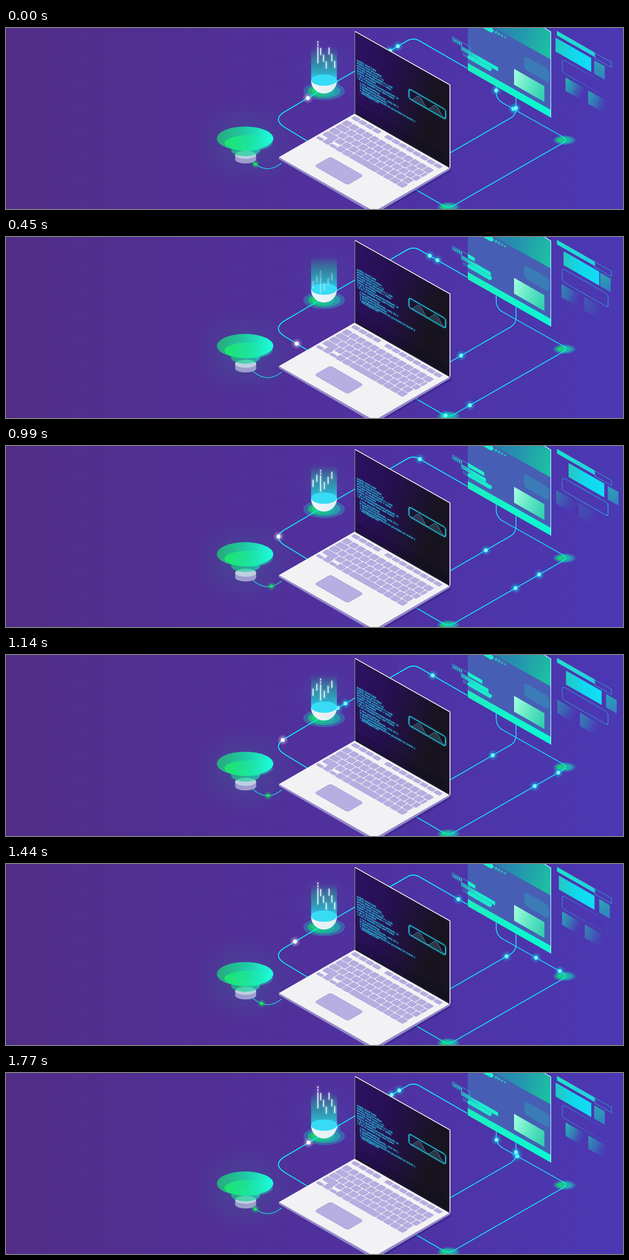
Recreate the animation shown at these times as an HTML page with a canvas. Size 1280 px wide and 377 px high, loop 1800 ms.

```html
<!DOCTYPE html>
<html lang="en">
<head>
<meta charset="utf-8">
<title>Connected laptop</title>
<style>
html, body { margin: 0; width: 100%; height: 100%; overflow: hidden; background: #502f9a; }
canvas { display: block; }
</style>
</head>
<body>
<canvas id="stage" width="1280" height="377"></canvas>
<script>
const W = 1280, H = 377, LOOP = 1800, STEP = 30, CYCLE = 1753, SLOPE = 0.575;
const TAU = Math.PI * 2, CYAN = '#10eef8';
const screen = document.getElementById('stage').getContext('2d');
let c = screen;

// ---- helpers ----
const mod = (a, n) => ((a % n) + n) % n;
const clamp = v => Math.max(0, Math.min(1, v));
const wave = (t, delay = -30, period = CYCLE) => Math.cos(TAU * (t - delay) / period);

function grad(x0, y0, x1, y1, ...stops) {
  const g = c.createLinearGradient(x0, y0, x1, y1);
  stops.forEach((color, i) => g.addColorStop(i / (stops.length - 1), color));
  return g;
}
function halo(x, y, r, rgb, alpha, squash = 1) {
  c.save();
  c.translate(x, y);
  c.scale(1, squash);
  const g = c.createRadialGradient(0, 0, 0, 0, 0, r);
  g.addColorStop(0, `rgba(${rgb},${alpha})`);
  g.addColorStop(0.5, `rgba(${rgb},${alpha * 0.4})`);
  g.addColorStop(1, `rgba(${rgb},0)`);
  c.fillStyle = g;
  c.fillRect(-r, -r, 2 * r, 2 * r);
  c.restore();
}
function oval(x, y, rx, ry, fill) {
  c.beginPath();
  c.ellipse(x, y, rx, ry, 0, 0, TAU);
  c.fillStyle = fill;
  c.fill();
}
function trace(pts) {
  c.beginPath();
  pts.forEach(([x, y], i) => i ? c.lineTo(x, y) : c.moveTo(x, y));
}
function poly(fill, ...pts) {
  trace(pts);
  c.closePath();
  c.fillStyle = fill;
  c.fill();
}
function line(color, width, ...pts) {
  trace(pts);
  c.strokeStyle = color;
  c.lineWidth = width;
  c.stroke();
}
function box(x, y, w, h, { fill, stroke, r = 0, lw = 1 }) {
  c.beginPath();
  c.roundRect(x, y, w, h, r);
  if (fill) { c.fillStyle = fill; c.fill(); }
  if (stroke) { c.strokeStyle = stroke; c.lineWidth = lw; c.stroke(); }
}
// Upright plate receding to the right
function plate(x, y, w, h, style) {
  c.save();
  c.transform(1, SLOPE, 0, 1, x, y);
  box(0, 0, w, h, style);
  c.restore();
}
function layer(draw) {
  const cv = document.createElement('canvas');
  cv.width = W;
  cv.height = H;
  c = cv.getContext('2d');
  draw();
  c = screen;
  return cv;
}

// ---- routes: polylines with rounded corners ----
function route(...pts) {
  const out = [pts[0]];
  for (let i = 1; i < pts.length - 1; i++) {
    const [x, y, r] = pts[i];
    const toward = ([px, py]) => {
      const d = Math.hypot(px - x, py - y);
      return [x + (px - x) * r / d, y + (py - y) * r / d];
    };
    const a = toward(pts[i - 1]), b = toward(pts[i + 1]);
    for (let k = 0; k <= 14; k++) {
      const u = k / 14, v = 1 - u;
      out.push([0, 1].map(n => v * v * a[n] + 2 * u * v * pts[i][n] + u * u * b[n]));
    }
  }
  out.push(pts[pts.length - 1]);
  return out;
}
function pointAt(path, d) {
  for (let i = 1; i < path.length; i++) {
    const [ax, ay] = path[i - 1], [bx, by] = path[i];
    const len = Math.hypot(bx - ax, by - ay);
    if (d <= len) return [ax + (bx - ax) * d / len, ay + (by - ay) * d / len];
    d -= len;
  }
  return null;
}
const upper = route([668, 122], [845, 19.3, 15], [957, 84]);
const left = route([625, 235.5], [551, 190.3, 33], [648, 133]);
const middle = route([918, 262], [1058, 181, 14], [1058, 145]);
const outer = route([849, 336], [918, 376, 12], [1166.5, 233, 14], [1017, 148.5, 16], [1017, 122]);
const wire = route([572, 281], [543, 302, 31], [511, 279]);

const cyan = { fill: '#7df6ff', rgb: '0,225,255', r: 4 };
const white = { fill: '#ffffff', rgb: '235,225,255', r: 4 };
const green = { fill: '#17e565', rgb: '20,230,100', r: 3.2 };

// Sends one dot along a path per period; speed in px per ms
function send(t, path, start, speed, look = cyan, period = CYCLE) {
  const p = pointAt(path, mod(t - start, period) * speed);
  if (!p) return;
  halo(...p, look.r * 2.9, look.rgb, 0.85);
  oval(...p, look.r, look.r, look.fill);
}
function drawDots(t) {
  for (const start of [-72, 936, 1026]) send(t, upper, start, 0.205);
  for (const start of [30, 214]) send(t, outer, start, 0.3067, cyan, LOOP);
  send(t, middle, 176, 0.11);
  send(t, left, 192, 0.0987, white);
  send(t, wire, 460, 0.046, green);
}

// ---- still parts behind the dots ----
function rings(x, y, s) {
  oval(x, y, 23 * s, 10 * s, 'rgba(38,165,190,.42)');
  oval(x, y, 18 * s, 7.6 * s, grad(x - 18 * s, y, x + 18 * s, y, 'rgba(20,205,110,.75)', 'rgba(32,180,185,.6)'));
  oval(x - s, y, 13 * s, 5.4 * s, grad(x - 13 * s, y, x + 13 * s, y, 'rgba(20,225,110,.7)', 'rgba(25,190,180,.5)'));
}
const back = layer(() => {
  c.fillStyle = grad(0, 0, W, 0, '#522d88', '#50309c', '#4b38b4');
  c.fillRect(0, 0, W, H);
  halo(496, 240, 110, '20,190,160', 0.2, 0.85);
  halo(660, 85, 70, '60,140,210', 0.14);
  rings(1158.5, 233.5, 1);
  rings(918, 373, 1);
  rings(660, 131.5, 1.88);
  for (const path of [upper, left]) line(CYAN, 2, ...path);
  for (const path of [middle, outer]) line(CYAN, 1.7, ...path);
  line('#12dfe0', 1.4, ...wire);
});

// ---- still parts in front of the dots ----
function webPanel() {
  poly('#465fb4', [958, 0], [1117, 0], [1131, 8], [1131, 187], [958, 88]);
  poly(grad(1010, 0, 1131, 40, '#2c79b2', '#2399ad', '#1cc2a2'), [1013, 0], [1117, 0], [1131, 8], [1131, 66]);
  poly(grad(958, 0, 1131, 0, '#1deec0', '#08fbd4'), [958, 73], [1131, 171], [1131, 187], [958, 88]);
  line('#a8e2ef', 1.6, [1117, 0], [1130.2, 8], [1130.2, 186]);
  c.lineCap = 'round';
  line('#17f1cd', 9, [985, -8], [1007, 5]);
  line('#1de8cd', 8, [961, 60.5], [1004, 85.5]);
  c.lineCap = 'butt';
  plate(1075, 57, 52, 28, { fill: '#3a7bb8', r: 7 });
  plate(1054, 85, 63, 33, { fill: grad(0, 0, 63, 22, '#a9ffe2', '#62e8c4', '#2fcdb0') });
  plate(926, 18, 37, 9, { stroke: '#22b9cc', r: 1 });
  for (let i = 0; i < 5; i++) plate(928.5 + i * 3.8, 21.5 + i * 2.2, 2.2, 5, { fill: '#1df0cf' });
  for (let i = 0; i < 3; i++) plate(948.5 + i * 3, 51 + i * 1.7, 1.1, 7, { fill: '#38a8c8' });
}

const code = `public kind held
public bind provided
private bind inner = []
private load provided a = null
public on load(value) = false
return provided
{ dc in dummy(provider,default: e)
/ if dc is loaded even per frame

  // the something
  if public(bind,elem|dc, only in) }
  } bind.provided(inner)
  { handlement(default) be provided an instal }
   message(true)`;

function display() {
  poly('#1d1730', [724, 6], [921, 118], [921, 292], [724, 179]);
  poly(grad(726, 0, 918, 60, '#2e1264', '#25104e', '#17141f'), [726, 11], [918, 120], [918, 287], [726, 176]);
  // faint reflection of the keys
  c.save();
  trace([[726, 158], [918, 268], [918, 287], [726, 176]]);
  c.clip();
  for (let i = 0; i < 4; i++) line('rgba(8,4,24,.4)', 1, [726, 160 + i * 5], [918, 270 + i * 5]);
  for (let x = 0; x < 220; x += 14) line('rgba(8,4,24,.4)', 1, [700 + x, 140 + x * SLOPE], [732 + x, 180 + x * SLOPE]);
  c.restore();
  line('#f4f1fb', 1.8, [724, 7], [921, 118.5], [921, 291]);
  line('#cfc8e6', 0.8, [723.8, 7], [723.8, 178]);

  c.fillStyle = '#36d9ec';
  c.shadowColor = '#10a8e0';
  c.shadowBlur = 3;
  c.font = 'bold 4.4px "DejaVu Sans", sans-serif';
  code.split('\n').forEach((text, i) => {
    const body = text.trimStart();
    c.save();
    c.transform(1, 0.57, 0, 1, 728 + 3 * (text.length - body.length), 68.6 + 5.2 * i);
    c.fillText(body, 0, 0);
    c.restore();
  });
  plate(836, 126.5, 76, 20, { stroke: '#28dfe9', r: 4, lw: 1.5 });
  c.shadowBlur = 0;

  // two humps on the slanted chart floor
  const hump = [];
  for (let x = 0; x <= 69; x++) hump.push([840 + x, 148 + x * 0.56 - 15 * Math.sin(Math.PI * x / 34.5) ** 2]);
  poly('rgba(75,110,130,.4)', ...hump);
  line('#4f8b9f', 1, ...hump);
}

function base() {
  poly('rgba(45,30,115,.45)', [921, 295], [926, 297], [790, 377], [764, 384]);
  poly('#9389cb', [566, 269], [764, 382], [921, 291], [921, 295], [764, 388], [566, 273]);
  poly('#f2f2f4', [724, 178], [921, 291], [764, 382], [566, 269]);

  c.save();
  c.transform(0.867, 0.498, -0.866, 0.5, 724, 178);
  const key = (x, y, w = 14.5, h = 13.2) => box(x, y, w, h, { fill: '#b6ade0', stroke: '#a79dd8', r: 2, lw: 0.6 });
  for (let i = 0; i < 4; i++) key(5 + i * 16.7, 6, 14.5, 8.5);
  for (let i = 0; i < 8; i++) key(84 + i * 16.8, 6, 14.5, 8.5);
  for (let row = 0; row < 4; row++) {
    const y = 24 + row * 15.3, first = 14 + row * 9 % 14;
    key(4.5, y, first);
    for (let x = 6.8 + first; x < 209; x += 16.2) key(x, y, Math.min(14, 213.5 - x));
  }
  for (let i = 0; i < 3; i++) key(4 + i * 15.5, 91, 13.5, 6.5);
  key(19.5, 84, 13.5, 6.5);
  for (let i = 0; i < 10; i++) if (i < 2 || i > 5) key(50 + i * 16.4, 85.2);
  key(82.6, 85.2, 64);
  box(61, 120, 79, 38, { fill: '#b7aee1', stroke: '#a39ad4', r: 5, lw: 0.8 });
  c.restore();
}

function bowl() {
  c.fillStyle = grad(0, 41, 0, 110, 'rgba(30,190,150,0)', 'rgba(35,180,160,.5)', 'rgba(40,182,190,.8)', 'rgba(50,205,235,.97)');
  c.fillRect(633, 41, 53.5, 68);
  c.beginPath();
  c.ellipse(659.7, 109, 27, 27.5, 0, 0, Math.PI);
  c.fillStyle = grad(633, 0, 687, 0, '#f0f4f8', '#dfeef2');
  c.fill();
  oval(659.7, 108.5, 27, 11.8, '#38dbf5');
}
const front = layer(() => {
  webPanel();
  base();
  display();
  bowl();
});

// ---- moving parts ----
function cone(t) {
  const y = 227.5 + 2.7 * wave(t, -60);
  c.fillStyle = '#9d9dce';
  c.fillRect(475.5, 264, 43.5, 10);
  oval(497.2, 274, 21.8, 8, '#9d9dce');
  oval(497.2, 264, 21.8, 8.5, '#bccfe0');
  oval(497, y + 24.5, 30, 12.5, grad(467, 0, 527, 0, 'rgba(25,205,125,.7)', 'rgba(30,215,185,.7)'));
  oval(496, y, 58.5, 25, grad(438, 0, 554, 0, 'rgba(30,195,120,.82)', 'rgba(26,220,165,.88)', '#1cffe0'));
  oval(503.5, y + 9.5, 50, 16.5, grad(454, 0, 553, 0, 'rgba(28,238,105,.85)', 'rgba(28,235,150,.65)', 'rgba(27,255,222,.25)'));
}

// Two showers of streaks rise in the beam and settle; one of each is long and broken
const showers = [
  { start: 1300, x: 647, gap: 5.8, count: 7, long: 0, rest: k => 27 + k * 14 % 43 },
  { start: 430, x: 637, gap: 7.8, count: 6, long: 2, rest: k => 40 + mod(30 - 10.5 * k, 36) }
];
function drawStreaks(t) {
  c.save();
  c.shadowColor = '#c9f4ff';
  c.shadowBlur = 4;
  c.fillStyle = '#ffffff';
  for (const { start, x, gap, count, long, rest } of showers) {
    const u = mod(t - start, LOOP) / 820;
    if (u >= 1) continue;
    c.globalAlpha = Math.min(1, u / 0.06, (1 - u) / 0.12);
    for (let k = 0; k < count; k++) {
      const y = rest(k) + 24 * (1 - u) ** 4;
      const bar = (a, b) => c.fillRect(x + k * gap - 0.8, y + a, 1.7, b - a);
      if (k === long) {
        bar(0, 4);
        bar(6, 10);
        bar(12, 46);
      } else bar(0, 15);
    }
  }
  c.restore();
}

function bars(t) {
  const grow = clamp((t - 350) / 250) * (1 - clamp((t - 800) / 850) ** 2);
  if (grow > 0.02) plate(958, 35, 36 * grow, 8, { fill: '#1df0cb' });
  const len = 63.5 + 13.5 * wave(t);
  plate(944, 38, len, 8, { fill: grad(0, 0, len, 0, 'rgba(40,190,195,.75)', '#1bebcf', '#14f3cd') });
  for (let i = 0; i < 4; i++) {
    c.globalAlpha = i ? 1 : clamp(Math.abs(t - 1590) / 150);
    oval(1016.5 + i * 6.2, 9 + i * 3.4, 3.2 - i * 0.3, 3.2 - i * 0.3, '#26b2b8');
  }
  c.globalAlpha = 1;
}

function cards(t) {
  plate(1143, 6, 78, 9.5, { fill: grad(0, 0, 78, 0, '#1ce3cb', '#25cfdf') });
  const slide = 14.5 * (1 - wave(t));
  plate(1140 + slide, 20 + slide * SLOPE, 74, 29, { fill: grad(0, 0, 74, 0, '#23c8c0', '#10d8ee', '#12def5') });
  plate(1222, 52, 34, 11, { stroke: '#2bb3d2' });
  const late = 14.5 * (1 - wave(t, 50));
  plate(1220 + late, 67 + late * SLOPE, 22, 28, { fill: grad(0, 0, 22, 28, '#2fa3b8', '#3080bd') });

  const lit = clamp(0.5 - 0.65 * wave(t, -90));
  plate(1154, 65, 95, 27, {
    r: 5, lw: 1.2,
    stroke: grad(0, 0, 95, 0, 'rgba(40,180,220,.75)', `rgba(25,210,230,${0.35 + 0.6 * lit})`, `rgba(20,225,240,${0.03 + 0.9 * lit})`)
  });

  const drift = 10 * (1 - wave(t, 50));
  const glow = [0.7 + 0.3 * wave(t), 0.6 + 0.4 * wave(t, 90, 600)];
  glow.forEach((alpha, i) => {
    const x = 1161 + i * 47 - drift;
    c.globalAlpha = alpha;
    plate(x, 103 + (x - 1161) * SLOPE, 37, 28, {
      fill: grad(0, 0, 37, 14, 'rgba(36,195,182,.95)', 'rgba(42,150,185,.75)', 'rgba(60,90,185,.1)')
    });
  });
  c.globalAlpha = 1;
}

function draw(t) {
  c.drawImage(back, 0, 0);
  cone(t);
  drawDots(t);
  c.drawImage(front, 0, 0);
  drawStreaks(t);
  bars(t);
  cards(t);
}

const begin = performance.now();
function tick() {
  const t = mod(performance.now() - begin, LOOP);
  draw(Math.floor(t / STEP) * STEP);
  requestAnimationFrame(tick);
}
tick();
</script>
</body>
</html>
```
